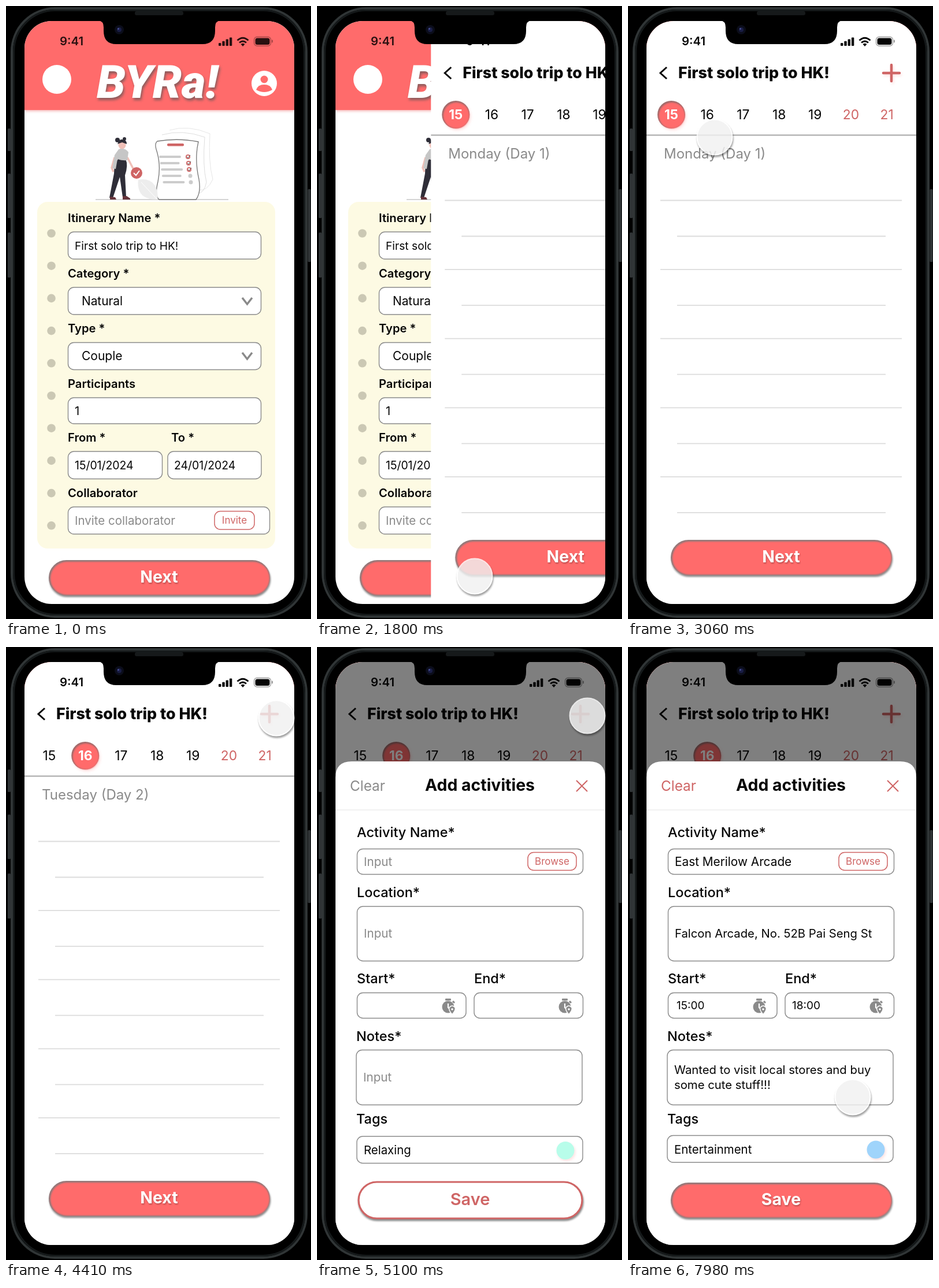
An HTML page that plays this animation: 528 px wide and 1061 px high, repeating every 8 s.

```html
<!DOCTYPE html>
<html lang="en">
<head>
<meta charset="utf-8">
<title>Trip planner</title>
<style>
html, body { margin: 0; width: 100%; height: 100%; overflow: hidden; background: #000; }
svg { display: block; width: 100vw; height: 100vh; font-family: Inter, "Open Sans", sans-serif; }
.lift { filter: drop-shadow(1px 3px 1.5px #0007); }
.soft { filter: blur(.8px); }
.rosy { filter: drop-shadow(0 2px 2px #e778); }
.glow { filter: drop-shadow(2px 3px 2px #f994); }
.ink { filter: drop-shadow(1px 2px 1px #0004); }
.logo { font: italic 900 80px Roboto, sans-serif; filter: drop-shadow(2px 4px 2px #555a); }
</style>
</head>
<body>
<svg id="stage" viewBox="0 0 528 1061"></svg>
<script>
const RED = '#ff6b6b', ROSE = '#cf6565', GREY = '#8a8a8a', INK = '#050505';

const text = (x, y, s, size = 20.3, fill = INK, weight = 400, anchor = 'start', cls = '') =>
  `<text x="${x}" y="${y}" font-size="${size}" fill="${fill}" font-weight="${weight}" text-anchor="${anchor}" class="${cls}">${s}</text>`;
const rect = (x, y, w, h, r, fill, more = '') =>
  `<rect x="${x}" y="${y}" width="${w}" height="${h}" rx="${r}" fill="${fill}" ${more}/>`;
const circle = (x, y, r, fill, more = '') =>
  `<circle cx="${x}" cy="${y}" r="${r}" fill="${fill}" ${more}/>`;
const path = (d, stroke, w = 2, fill = 'none', more = '') =>
  `<path d="${d}" fill="${fill}" stroke="${stroke}" stroke-width="${w}" ${more}/>`;
const group = (id, body, more = '') => `<g id="${id}" ${more}>${body}</g>`;
const times = (n, f) => Array.from({ length: n }, (_, i) => f(i)).join('');

const field = (x, y, w, h) => rect(x, y, w, h, 10, '#fff', `stroke="${GREY}" stroke-width="1.4"`);
const label = (x, y, s) => text(x, y, s, 20.2, INK, 600);
const heading = (x, y, s) => text(x, y, s, 23.5, INK, 500);
const pill = (y, s) =>
  `<g class="lift">${rect(74, y, 383, 61, 30.5, '#93797a')}${rect(77, y + 3, 379, 57, 28.5, RED, 'class="soft"')}</g>` +
  text(265, y + 39, s, 28.5, '#fff', 700, 'middle', 'ink');
const outlined = (x, y, w, h, s, base) =>
  rect(x, y, w, h, 10, '#fff', `stroke="${ROSE}" stroke-width="1.5"`) +
  text(x + w / 2, base, s, 17, ROSE, 400, 'middle');
const chevron = y => path(`M409 ${y}l8.5 11l8.5-11`, GREY, 3.5);

const status = ink => text(93, 68, '9:41', 20.4, ink, 600) +
  times(4, i => rect(368 + i * 6.3, 64 - i * 3.2, 4.4, 5 + i * 3.2, 1, ink)) +
  path('M400.5 59.5q9.5-8.5 19 0M404 63.5q6-5 12 0', ink, 2.8) + path('M406.5 66l3.5 4 3.5-4q-3.5-2.5-7 0', 'none', 0, ink) +
  rect(429.5, 53.5, 29, 15.5, 5, 'none', `stroke="${ink}" stroke-opacity=".4" stroke-width="1.3"`) +
  rect(431.5, 55.5, 25, 11.5, 3.5, ink) + rect(460, 58.5, 2, 5, 1, ink, 'opacity=".4"');

const picture =
  path('M155 335H385', '#aaa', 1) +
  path('M283 215Q315 205 353 221Q350 270 358 300Q348 322 332 318', '#e6e6e6', 1) +
  path('M270 223Q305 213 344 227Q340 276 347 305Q343 325 331 324', '#ddd', 1) +
  path('M262 234Q298 228 333 235Q326 265 334 300Q338 323 329 335H265Q257 328 263 304Q269 275 260 248Q257 238 262 234Z', '#777', 1.3, '#fff') +
  rect(279, 238, 29, 4.5, 2, ROSE) +
  times(5, i => rect(265 + i * 1.6, 259 + i * 11, 38 - (i % 2) * 4, 4, 2, '#ccc') +
    (i < 3 ? circle(315 + i, 261 + i * 11, 3.2, '#fff', `stroke="${ROSE}" stroke-width="1.7"`) +
      path(`M${313 + i} ${261 + i * 11}l2 2l4-5`, '#555', 1) : circle(316 + i, 261 + i * 11, 3.5, '#ccc'))) +
  path('M229 301q22-5 31 14q4 10 2 20q-22 0-29-11q-6-11-4-23Z', 'none', 0, '#ededed') +
  path('M234 305L261 334', '#fff', 1) +
  path('M188 262l-5 18 3 7M210 262l12 23', '#f0c0b8', 3.5) +
  path('M194 265h13q5 10-1 28l2 38h-6l-5-35-12 36h-6l8-42q0-18 7-25Z', 'none', 0, '#2f2e38') +
  path('M180 330l9 1 2 4h-11ZM202 329h7l6 4v2h-13Z', 'none', 0, '#65333a') +
  path('M195 248q10-4 17 5l-2 14q-9 1-17-2l-3 17-6-1 4-23Z', 'none', 0, '#c6c6c6') +
  circle(201, 241, 6.5, '#f0c0b8') + path('M193 239q3-9 8-8 8 0 8 8l-8-3Z', 'none', 0, '#2f2e38') +
  circle(193, 232, 4, '#2f2e38') + circle(205, 230, 3, '#2f2e38') +
  circle(226, 289, 10, ROSE) + path('M221 289l4 4 6-8', '#fff', 2);

const form = rect(32, 26, 467, 1009, 0, '#fff') +
  `<g class="rosy">${rect(32, 20, 467, 160, 0, RED)}</g>` + status('#2a1010') +
  circle(88, 127, 25, '#fff') + text(157, 159, 'BYRa!', 80, '#fff', 900, 'start', 'logo') +
  circle(447, 134, 22, '#fff') + circle(447, 127, 6.5, RED) + path('M433 145q3-9 14-9t14 9q-14 8-28 0', 'none', 0, RED) +
  picture + rect(54, 339, 412, 600, 18, '#fdfae3') +
  times(10, i => circle(78.5, 393.5 + i * 56.2, 7.3, '#cbc8b4')) +
  label(107, 374, 'Itinerary Name *') + field(107.5, 391, 334, 47) + text(119, 422, 'First solo trip to HK!', 19.2) +
  label(107, 470, 'Category *') + field(107.5, 487, 334, 47) + text(131, 518, 'Natural', 20.8) + chevron(505) +
  label(107, 565, 'Type *') + field(107.5, 582.5, 334, 47) + text(131, 613, 'Couple', 21) + chevron(600) +
  label(107, 661, 'Participants') + field(107.5, 678, 334, 45) + text(119, 708, '1') +
  label(107, 754, 'From *') + field(107.5, 771, 163, 47.5) + text(119, 802, '15/01/2024', 19.4) +
  label(286, 754, 'To *') + field(280, 771, 162, 47.5) + text(291, 802, '24/01/2024', 19.4) +
  label(107, 850, 'Collaborator') + field(107.5, 867, 349, 47) + text(119, 898, 'Invite collaborator', 20.5, GREY) +
  outlined(361, 874.5, 69, 31.5, 'Invite', 896) + pill(959, 'Next');

const days = picked => times(7, i => {
  const x = 75 + i * 62.2, on = i == picked;
  return (on ? `<g class="glow">${circle(x, 188, 24, '#a06b6b')}${circle(x + 1, 189.5, 22.5, RED, 'class="soft"')}</g>` : '') +
    text(x, 196, 15 + i, 22.8, on ? '#fff' : i > 4 ? ROSE : INK, on ? 700 : 400, 'middle');
});
const plan = status(INK) + path('M67 106L56 116L67 126', INK, 3) +
  text(87, 125, 'First solo trip to HK!', 26.8, INK, 800) +
  path('M456 102V130M442 116H470', ROSE, 4.5, 'none', 'class="glow" stroke-linecap="round"') +
  path('M32 223.5H499', '#a5a5a5', 2) +
  group('day1', days(0) + text(62, 264, 'Monday (Day 1)', 24, GREY)) +
  group('day2', days(1) + text(62, 264, 'Tuesday (Day 2)', 24, GREY)) +
  times(5, i => path(`M56 ${336.5 + i * 119.6}H474M85 ${398.5 + i * 119.6}H446`, '#dcdcdc', 1.8)) +
  pill(924, 'Next');

const timer = x => circle(x, 623, 10.5, GREY) + rect(x - 5, 608.5, 10, 3.5, 1, GREY) + path(`M${x + 8} 613l3 3`, GREY, 3) +
  path(`M${x} 617v7l4 4`, '#fff', 2.2) +
  path(`M${x + 7} 636q-7-8-5-12 5-6 10 0 2 4-5 12Z`, '#fff', 1.5, GREY) + circle(x + 7, 627, 1.8, '#fff');
const tag = (x, y, s, color) => field(x, y, 391, 46.5) + text(x + 12, y + 31, s, 20.4) +
  circle(x + 361, y + 24.5, 15.5, color, 'class="glow"');
const blank = text(57, 249, 'Clear', 24.3, GREY) +
  [[81, 379], [81, 503], [80, 752]].map(([x, y]) => text(x, y, 'Input', 20.6, GREY)).join('') +
  tag(69, 847, 'Relaxing', '#b8fdea') +
  rect(72, 926, 387, 63, 31.5, '#fff', `stroke="${ROSE}" stroke-width="3.2" class="lift"`) +
  text(265, 966, 'Save', 29, ROSE, 600, 'middle');
const filled = text(57, 249, 'Clear', 24.3, ROSE) +
  text(81, 379, 'East Merilow Arcade', 20.8) + text(81, 503, 'Falcon Arcade, No. 52B Pai Seng St') +
  text(84, 627, '15:00', 19) + text(284, 627, '18:00', 19) +
  text(80, 739, 'Wanted to visit local stores and buy') + text(80, 765, 'some cute stuff!!!') +
  tag(68, 845.5, 'Entertainment', '#9fd4fb') + pill(927, 'Save');
const sheet = path('M32 1040V226Q32 198 60 198H471Q499 198 499 226V1040Z', 'none', 0, '#fff') +
  path('M32 282H499', '#ececec', 1.5) + text(282, 249, 'Add activities', 28.4, INK, 700, 'middle') +
  path('M449 231l19 19M468 231l-19 19', ROSE, 2) +
  heading(69, 329, 'Activity Name*') + field(69.5, 349.5, 391, 44) + outlined(365, 355.5, 84, 31, 'Browse', 377) +
  heading(69, 433, 'Location*') + field(69.5, 449, 391, 94.5) +
  heading(69, 582, 'Start*') + field(69.5, 598.5, 188.5, 44) + timer(227) +
  heading(272, 582, 'End*') + field(272, 598.5, 188.5, 44) + timer(429) +
  heading(68, 682, 'Notes*') + field(68, 697.5, 391, 95) + heading(68, 825, 'Tags') +
  group('blank', blank) + group('filled', filled);

const phone = rect(0, 0, 528, 1061, 0, '#000') +
  rect(10, 4, 510, 1053, 75, '#000', 'stroke="#303536" stroke-width="4"') +
  rect(13.5, 7.5, 503, 1046, 72, 'none', 'stroke="#15191a" stroke-width="3"') +
  [[212, 39], [290, 77], [392, 78]].map(([y, h]) => rect(3, y, 5, h, 1.5, '#303436')).join('') +
  rect(522.5, 317, 5, 126, 1.5, '#303436') + rect(223, 9, 84, 7, 3, '#16191a');
const notch = path('M160 25Q169 26 169 37V43Q169 66 191 66H340Q362 66 362 43V37Q362 26 371 25Z', 'none', 0, '#000') +
  circle(196, 41, 8, '#0b0d1a') + circle(196, 41, 4, '#191d45') + circle(194.5, 39.5, 1.5, '#4a5096');

const $ = id => document.getElementById(id);
$('stage').innerHTML =
  `<clipPath id="screen">${rect(32, 26, 467, 1009, 47, '#000')}</clipPath>` +
  phone + `<g clip-path="url(#screen)">` + form + `<rect id="page" y="26" height="1009" fill="#fff"/>` + group('plan', plan) +
  rect(32, 26, 467, 1009, 0, '#000', 'id="dim"') + group('sheet', sheet) + '</g>' + notch +
  group('cursor', `<g class="lift">${circle(0, 0, 30.5, '#f1f1f1', 'stroke="#fff" stroke-width="2"')}</g>`);

// time, x, y of the touch point
const stops = [
  [30, 360, 795], [1500, 273, 987], [2630, 273, 987], [3050, 150, 227], [3290, 150, 227],
  [4080, 500, 118], [4400, 468, 123], [4680, 468, 123], [4800, 468, 119], [5120, 468, 119],
  [5250, 496, 150], [5480, 433, 262], [5900, 168, 415], [6200, 222, 366],
  [6980, 222, 379], [7740, 388, 768], [7979, 388, 768], [7980, 389, 779], [8000, 389, 779]
];
const unit = v => Math.max(0, Math.min(1, v));
const smooth = v => v * v * (3 - 2 * v);
const easeOut = (t, start, span) => 1 - (1 - unit((t - start) / span)) ** 1.72;
const move = (id, x, y) => $(id).setAttribute('transform', `translate(${x} ${y})`);
const fade = (id, v) => { $(id).style.opacity = v; };

function draw(t) {
  const slide = 467 * (1 - easeOut(t, 1665, 300));
  move('plan', slide, 0);
  $('page').setAttribute('x', 32 + slide);
  $('page').setAttribute('width', 467 - slide);
  fade('day1', +(t < 3300));
  fade('day2', +(t >= 3300));

  const rise = easeOut(t, 4670, 300);
  fade('dim', rise / 2);
  move('sheet', 0, 840 * (1 - rise));
  const fill = unit((t - 6365) / 100);
  fade('filled', fill);
  fade('blank', 1 - fill);

  const i = Math.max(1, stops.findIndex(s => s[0] > t));
  const [t0, x0, y0] = stops[i - 1], [t1, x1, y1] = stops[i];
  const k = smooth(unit((t - t0) / (t1 - t0)));
  move('cursor', x0 + (x1 - x0) * k, y0 + (y1 - y0) * k);
  fade('cursor', t >= 30 && (t < 6355 || t >= 6990) ? .82 : 0);
}

const begin = performance.now();
function tick() {
  draw((performance.now() - begin) % 8000);
  requestAnimationFrame(tick);
}
tick();
</script>
</body>
</html>
```
